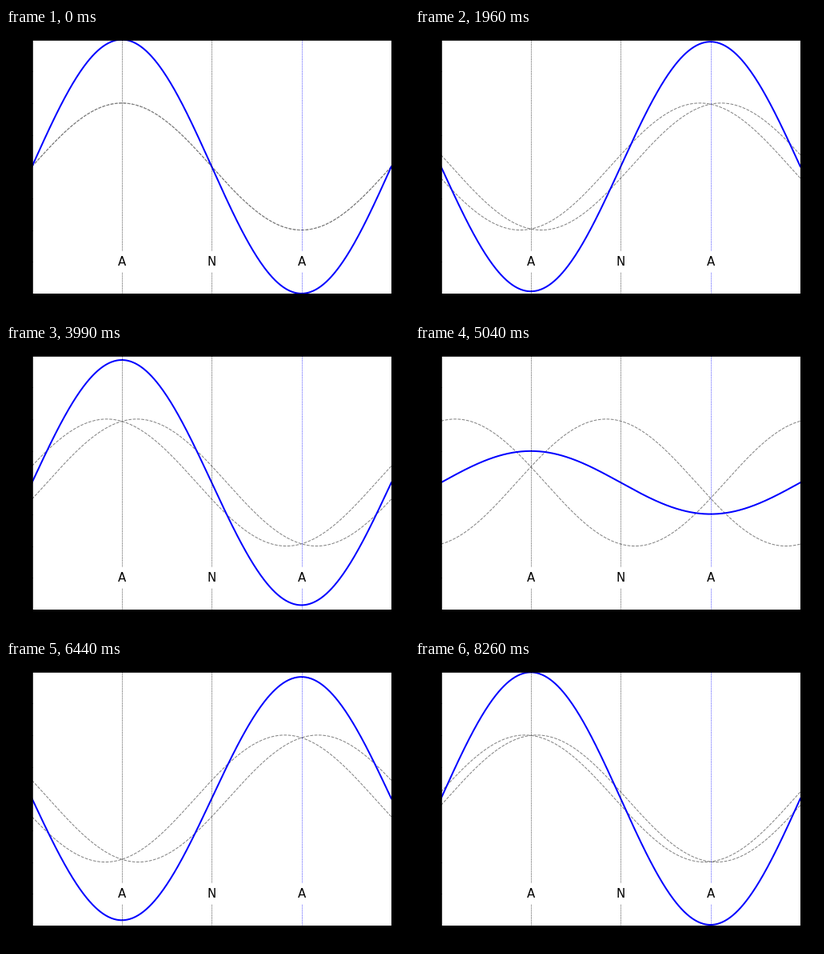
A matplotlib script for the animation above (8330 ms loop, 504 by 360 pixels).

```python
import numpy as np
import matplotlib.pyplot as plt
from matplotlib.animation import FuncAnimation

W, H, DPI = 504, 360, 72
FRAMES, INTERVAL = 119, 70
LEFT, RIGHT, TOP, BOTTOM = 32.5, 481.9, 14.5, 331.9

fig = plt.figure(figsize=(W / DPI, H / DPI), dpi=DPI, facecolor="black")
ax = fig.add_axes([LEFT / W, 1 - BOTTOM / H, (RIGHT - LEFT) / W, (BOTTOM - TOP) / H])
ax.set(xlim=(0, 2 * np.pi), ylim=(-2, 2), xticks=[], yticks=np.arange(-2, 2.1, 0.5))
ax.tick_params(labelleft=False)

x = np.linspace(0, 2 * np.pi, 400)
right_wave, = ax.plot([], [], "--", color="gray", lw=1)
left_wave, = ax.plot([], [], "--", color="gray", lw=1)
standing, = ax.plot([], [], color="blue", lw=2)

# Antinodes and the node between them
for k, label, color in ((1, "A", "black"), (2, "N", "black"), (3, "A", "blue")):
    pos = k * np.pi / 2
    ax.axvline(pos, color=color, ls=":", lw=0.8)
    ax.text(pos, -1.5, label, fontsize=15, family="DejaVu Sans",
            ha="center", va="center",
            bbox=dict(facecolor="white", edgecolor="none", pad=6))


def update(i):
    phase = 4 * np.pi * i / FRAMES
    a, b = np.sin(x - phase), np.sin(x + phase)
    right_wave.set_data(x, a)
    left_wave.set_data(x, b)
    standing.set_data(x, a + b)
    return right_wave, left_wave, standing


anim = FuncAnimation(fig, update, frames=FRAMES, interval=INTERVAL,
                     repeat=True, repeat_delay=0)
plt.show()
```
